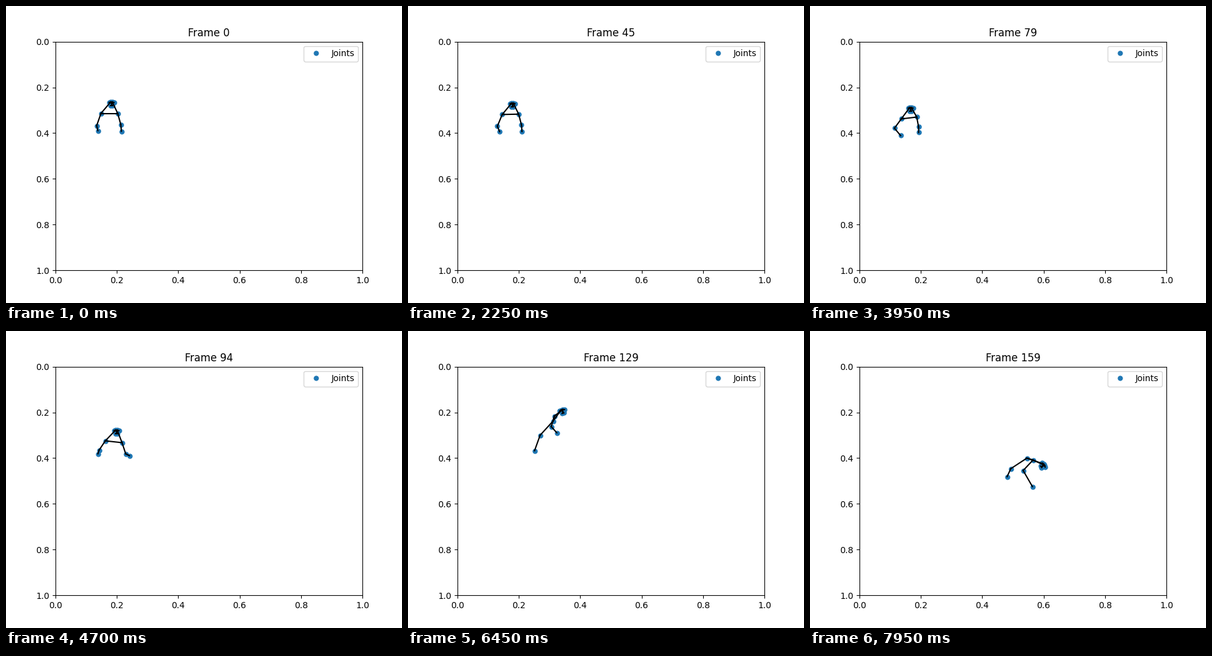
Recreate the animation shown at these times as a matplotlib script. Size 640 px wide and 480 px high, loop 8000 ms.

```python
import numpy as np
import matplotlib.pyplot as plt
from matplotlib.animation import FuncAnimation

FRAMES, INTERVAL = 160, 50
SWAY = 53  # frames per sway while standing


def pose(*points):
    return np.array(points, float)


# Stage pixels: head, shoulders (left, right), elbows, wrists
STAND = pose((170, 157), (153, 173), (180, 173), (146, 193), (185, 191), (148, 201), (186, 202))
LEAN = pose((162, 166), (147, 182), (172, 179), (136, 197), (175, 195), (146, 209), (175, 204))
STEP = pose((178, 162), (160, 177), (187, 180), (150, 192), (193, 198), (148, 198), (199, 201))
TURN = pose((219, 143), (197, 158), (225, 165), (181, 173), (225, 186), (175, 191), (224, 206))
REACH = pose((249, 129), (234, 145), (236, 137), (213, 168), (231, 154), (204, 193), (240, 164))
BOW = pose((376, 217), (350, 205), (360, 208), (324, 222), (344, 225), (318, 235), (359, 251))

# When the moves from one pose to the next begin and end
MOVES = [80, 94, 110, 129, 138, 159], [0, 1, 2, 3, 3, 4]
TILTS = np.radians([0, 0, 0, -15, 55])

# Joints 0-3 ear, eyes, ear; 4-5 mouth; 6 nose; 7-12 shoulders to wrists
BONES = [(0, 1), (1, 2), (2, 3), (1, 6), (2, 6), (4, 5), (1, 7), (2, 8),
         (7, 8), (7, 9), (9, 11), (8, 10), (10, 12)]


def pulse(frame, centre, width):
    return np.cos(np.pi / 2 * np.clip((frame - centre) / width, -1, 1)) ** 2


def body(frame, stage):
    sway = (1 - np.cos(2 * np.pi * frame / SWAY)) / 2
    start = STAND + sway * (LEAN - STAND)
    poses = [start, STEP, TURN, REACH, BOW]
    k = min(int(stage), 3)
    points = poses[k] + (stage - k) * (poses[k + 1] - poses[k])
    # Arm swings: the right arm drops, later the left one reaches back
    right = pulse(frame, 99, 4) * np.array([4, 16])
    left = pulse(frame, 143, 7) * np.array([-75, 17])
    points[3:5] += 0.4 * np.array([left, right])
    points[5:7] += [left, right]
    return points


def face(tilt):
    x = np.linspace(-4, 4, 4)
    top = np.column_stack([x, x * x / 16 - 2.5])
    offsets = np.vstack([top, [(-1.5, 3.5), (1.5, 3.5), (0.5, 2)]])
    c, s = np.cos(tilt), np.sin(tilt)
    return offsets @ np.array([[c, s], [-s, c]])


def joints(frame):
    stage = np.interp(frame, *MOVES)
    points = body(frame, stage)
    tilt = np.interp(stage, range(5), TILTS)
    pixels = np.vstack([points[0] + face(tilt), points[1:]]) + 0.5
    return (pixels - (80, 57.6)) / (496, 369.6)


fig, ax = plt.subplots(figsize=(6.4, 4.8), dpi=100)
ax.set_xlim(0, 1)
ax.set_ylim(1, 0)
dots, = ax.plot([], [], "o", color="tab:blue", markersize=5, label="Joints")
bones = [ax.plot([], [], "k-", lw=1.5)[0] for _ in BONES]
title = ax.set_title("Frame 0")
ax.legend(loc="upper right")


def update(frame):
    pts = joints(frame)
    dots.set_data(*pts.T)
    for line, ends in zip(bones, BONES):
        line.set_data(*pts[list(ends)].T)
    title.set_text(f"Frame {frame}")
    return [dots, title, *bones]


anim = FuncAnimation(fig, update, frames=FRAMES, interval=INTERVAL,
                     init_func=lambda: update(0), repeat=True, repeat_delay=0)
plt.show()
```
